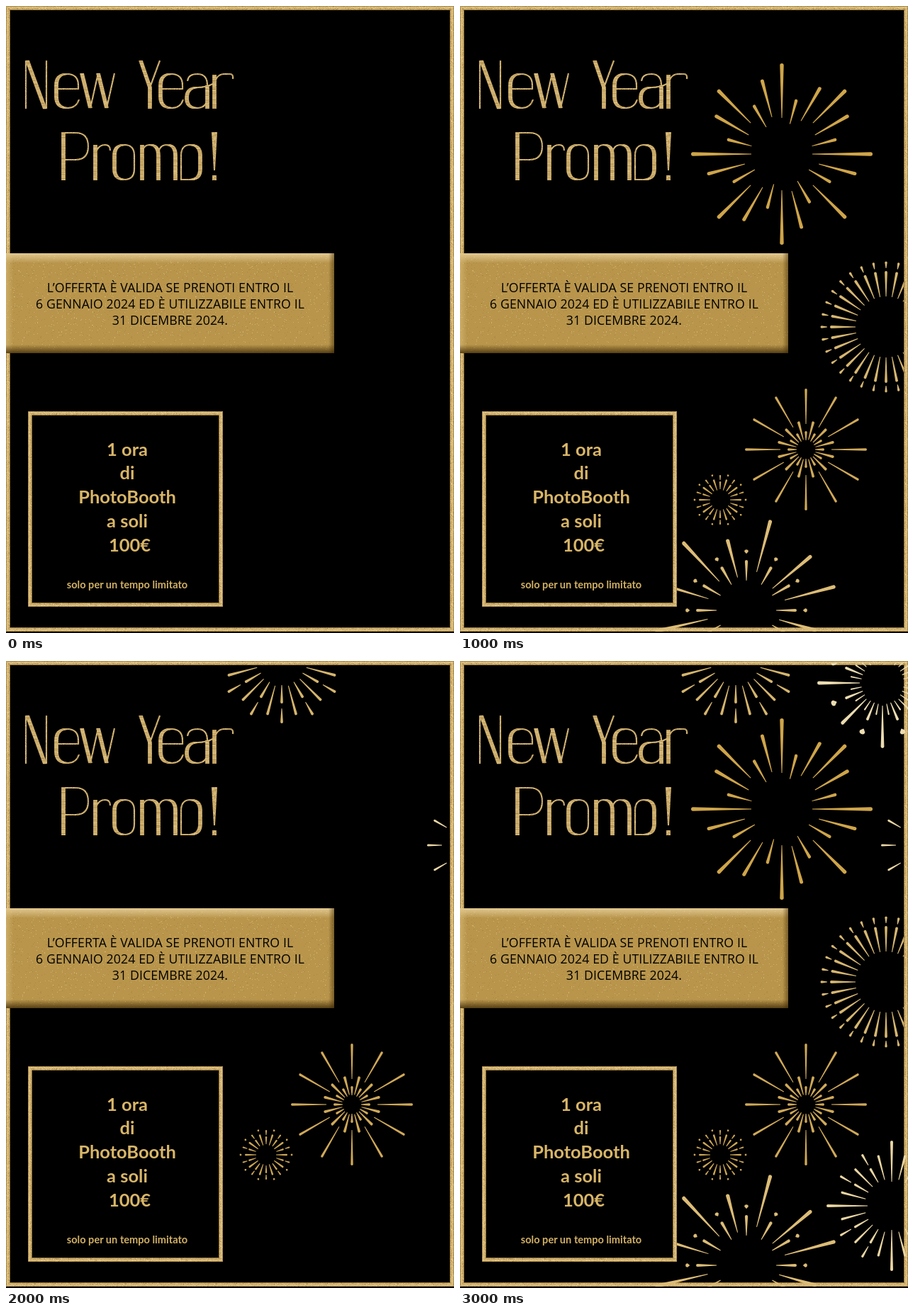
These frames come from a looping animation (632x885 px, 3400 ms). An HTML page with a canvas:

```html
<!DOCTYPE html>
<html lang="it">
<head>
<meta charset="utf-8">
<title>New Year Promo!</title>
<style>
html, body { margin: 0; width: 100%; height: 100%; overflow: hidden; background: #000; }
canvas, svg { position: absolute; left: 0; top: 0; }
text { text-anchor: middle; }
.offer { font: 17.7px "Open Sans", "Noto Sans", sans-serif; letter-spacing: .1px; fill: #000; }
.price { font: 700 25.5px Lato, sans-serif; fill: #d9b668; }
.note { font: 700 14.6px Lato, sans-serif; fill: #d2b064; }
</style>
</head>
<body>
<canvas id="stage" width="632" height="885" role="img" aria-label="New Year Promo!"></canvas>
<svg width="632" height="885">
  <g class="offer">
    <text x="231.5" y="404">L’OFFERTA È VALIDA SE PRENOTI ENTRO IL</text>
    <text x="231.5" y="427">6 GENNAIO 2024 ED È UTILIZZABILE ENTRO IL</text>
    <text x="231.5" y="450">31 DICEMBRE 2024.</text>
  </g>
  <g class="price">
    <text x="171" y="635">1 ora</text>
    <text x="171" y="668">di</text>
    <text x="171" y="702">PhotoBooth</text>
    <text x="171" y="736">a soli</text>
    <text x="174.5" y="770">100€</text>
  </g>
  <text class="note" x="171" y="822">solo per un tempo limitato</text>
</svg>
<script>
const ctx = document.getElementById('stage').getContext('2d');

let seed = 7;
const random = () => (seed = seed * 16807 % 2147483647) / 2147483647;

// Glittering gold as a repeating tile
function grain(base, specks) {
  const tile = document.createElement('canvas');
  tile.width = tile.height = 128;
  const g = tile.getContext('2d');
  g.fillStyle = base;
  g.fillRect(0, 0, 128, 128);
  for (let i = 0; i < specks; i++) {
    g.fillStyle = random() < .5 ? 'rgba(245,222,165,.4)' : 'rgba(140,100,40,.3)';
    g.fillRect(random() * 128 | 0, random() * 128 | 0, 1, 1);
  }
  return ctx.createPattern(tile, 'repeat');
}
const glitter = grain('#cdae6c', 8000);
const satin = grain('#b8954b', 600);

function rim(x, y, w, h) {
  const line = (inset, width, style) => {
    ctx.strokeStyle = style;
    ctx.lineWidth = width;
    ctx.strokeRect(x + inset, y + inset, w - 2 * inset, h - 2 * inset);
  };
  line(3, 6, glitter);
  line(.5, 1, 'rgba(120,85,30,.4)');
  line(2, 2, 'rgba(240,215,155,.35)');
  line(5.5, 1, 'rgba(80,55,15,.5)');
}

function shade(x, y, w, h, dx, dy, from, to) {
  const g = ctx.createLinearGradient(x, y, x + dx, y + dy);
  g.addColorStop(0, from);
  g.addColorStop(1, to);
  ctx.fillStyle = g;
  ctx.fillRect(x, y, w, h);
}

function banner() {
  ctx.fillStyle = satin;
  ctx.fillRect(0, 349, 463, 141);
  shade(0, 349, 463, 14, 0, 14, 'rgba(240,218,168,.75)', 'rgba(240,218,168,0)');
  shade(0, 349, 10, 141, 10, 0, 'rgba(225,195,130,.5)', 'rgba(225,195,130,0)');
  shade(455, 349, 8, 141, 8, 0, 'rgba(70,48,10,0)', 'rgba(70,48,10,.55)');
  shade(0, 478, 463, 12, 0, 12, 'rgba(60,40,5,0)', 'rgba(60,40,5,.8)');
}

// Display lettering: broad strokes and hairlines
const broad = new Path2D(`M30 77L55 145
  M86 96Q71 96 71 112V128Q71 144 87 144
  M107 95L119 144 M130 95L142 144
  M190 77L203 115V145
  M233 96Q218 96 218 112V128Q218 144 234 144
  M270 115Q255 115 255 130Q255 144 269 144 M284 145V112 M294 145V97
  M81 178V246 M126 246V196
  M167 196Q153 196 153 211V230Q153 245 167 245
  M192 246V196 M203 196Q215 196 215 211V246 M227 196Q239 196 239 211V246
  M260 196Q274 196 274 211V230Q274 245 260 245`);
const hair = new Path2D(`M28 145V77 M57 145V77
  M72 117H102V112Q102 96 86 96 M87 144Q99 144 103 132
  M119 144L130 95 M142 144L153 95 M217 77L203 115
  M219 117H249V112Q249 96 233 96 M234 144Q246 144 250 132
  M256 106Q257 96 270 96Q284 96 284 112 M270 115Q282 115 294 109 M269 144Q284 144 284 128
  M294 112Q296 96 308 96H316Q321 96 320 103
  M81 179H98Q116 179 116 198Q116 217 98 217H81
  M126 214Q127 196 140 196Q147 196 147 204
  M167 196Q181 196 181 211V230Q181 245 167 245
  M192 211Q192 196 203 196 M215 211Q215 196 227 196
  M260 245H247V211Q247 196 260 196`);
const bang = new Path2D('M290 178H298L295 232H293ZM291 239H297V246H291Z');

function title() {
  ctx.strokeStyle = ctx.fillStyle = glitter;
  ctx.lineWidth = 2.2;
  ctx.stroke(hair);
  // A flat nib: thick verticals, thin horizontals
  for (let dx = -1.8; dx <= 1.8; dx += .9) {
    ctx.setTransform(1, 0, 0, 1, dx, 0);
    ctx.stroke(broad);
  }
  ctx.resetTransform();
  ctx.fill(bang);
}

// Tapered ray with a rounded outer end; angle in degrees
function ray(angle, r0, r1, w) {
  ctx.save();
  ctx.rotate(angle * Math.PI / 180);
  ctx.beginPath();
  ctx.moveTo(r0, -.5);
  ctx.arc(r1 - w / 2, 0, w / 2, -Math.PI / 2, Math.PI / 2);
  ctx.lineTo(r0, .5);
  ctx.fill();
  ctx.restore();
}
const dot = (angle, r, size) => ray(angle, r - size, r + size, size * 2);
function ring(count, draw) {
  for (let i = 0; i < count; i++) draw(i * 360 / count, i);
}

const bursts = {
  S: { x: 367, y: 697, color: '#cda653', draw: () => ring(20, (a, i) => {
    if (i % 2) { ray(a, 15, 26, 2.4); ray(a, 28, 35, 2.2); }
    else { ray(a, 14, 30, 2.6); dot(a, 36, 1.4); }
  }) },
  B: { x: 454, y: 209, color: '#cfa549', draw: () => ring(24, (a, i) => {
    if (i % 3 == 0) ray(a, i % 6 ? 62 : i % 12 ? 51 : 43, 128, 5.4);
    else if ([1, 5, 8, 11, 14, 17, 20, 22].includes(i)) ray(a, 54, 109, 5);
    else ray(a, 44, 80, 4.4);
  }) },
  C: { x: 488, y: 626, color: '#d0a957', draw: () => ring(24, (a, i) => {
    if (i % 2) ray(a, 14, 41, 3.8);
    else { ray(a, 36, 86, 3.4); ray(a, 13, 26, 3.4); }
  }) },
  D: { x: 601, y: 453, color: '#d6b66f', right: 626, draw: () => ring(32, a => {
    ray(a, 43, 79, 3.8);
    ray(a, 83, 92.5, 3.4);
  }) },
  E: { x: 404, y: 853, color: '#dcbc76', draw: () => {
    for (const [a, r] of [[-15, 130], [-40, 120], [-75, 132], [-105, 104], [-133, 132], [-163, 130], [167, 132], [16, 103]])
      ray(a, r > 125 ? 56 : 48, r, 5.2);
    ring(12, a => { ray(a, 42, 71, 4.2); dot(a, 83, 2.8); });
  } },
  F: { x: 389, y: 0, color: '#d5b56c', draw: () => ring(24, (a, i) => {
    if (i % 2) ray(a, 36, 79, 3.8);
    else { ray(a, 34, 60, 3.8); ray(a, 67, 88, 3.8); }
  }) },
  G: { x: 596, y: 31, color: '#ecdcb0', draw: () => ring(16, (a, i) => {
    if (i % 2) { ray(a, 30, 57, 3.8); dot(a, 74, 4); }
    else ray(a, 32, i % 4 ? 82 : 92, 4.8);
    ray(a + 11.25, 30, 46, 2.2);
  }) },
  H: { x: 665, y: 260, color: '#ead7a4', right: 625, draw: () => ring(12, a => ray(a, 50, 71, 3)) },
  I: { x: 609, y: 769, color: '#ead6a2', draw: () => ring(24, (a, i) => {
    if (i % 6 == 0) ray(a, 34, 92, 4);
    else if (i % 2) ray(a, 38, 74, 3.4);
    else { ray(a, 38, 61, 3.4); ray(a, 66, 84, 3.4); }
  }) }
};

const all = 'SBCDEFGHI';
const finale = ['SCFH', 'BDI', 'SBCDE', 'SCFH', 'BDI', all];

function paint(step) {
  const lit = step < 10 ? all.slice(0, step) : finale[step - 10];
  ctx.fillStyle = '#000';
  ctx.fillRect(0, 0, 632, 885);
  rim(0, 0, 632, 883);
  title();
  banner();
  for (const key of lit) {
    const { x, y, color, right = 632, draw } = bursts[key];
    const top = lit == 'BDI' ? 88 : 3;
    ctx.save();
    ctx.beginPath();
    ctx.rect(0, top, right, 883 - top);
    ctx.clip();
    ctx.translate(x, y);
    ctx.fillStyle = color;
    draw();
    ctx.restore();
  }
  ctx.fillStyle = '#000';
  ctx.fillRect(31, 572, 275, 276);
  rim(31, 572, 275, 276);
}

let shown = -1;
function tick() {
  const step = Math.min(15, Math.floor(performance.now() % 3400 / 200));
  if (step != shown) paint(shown = step);
  requestAnimationFrame(tick);
}
tick();
</script>
</body>
</html>
```
